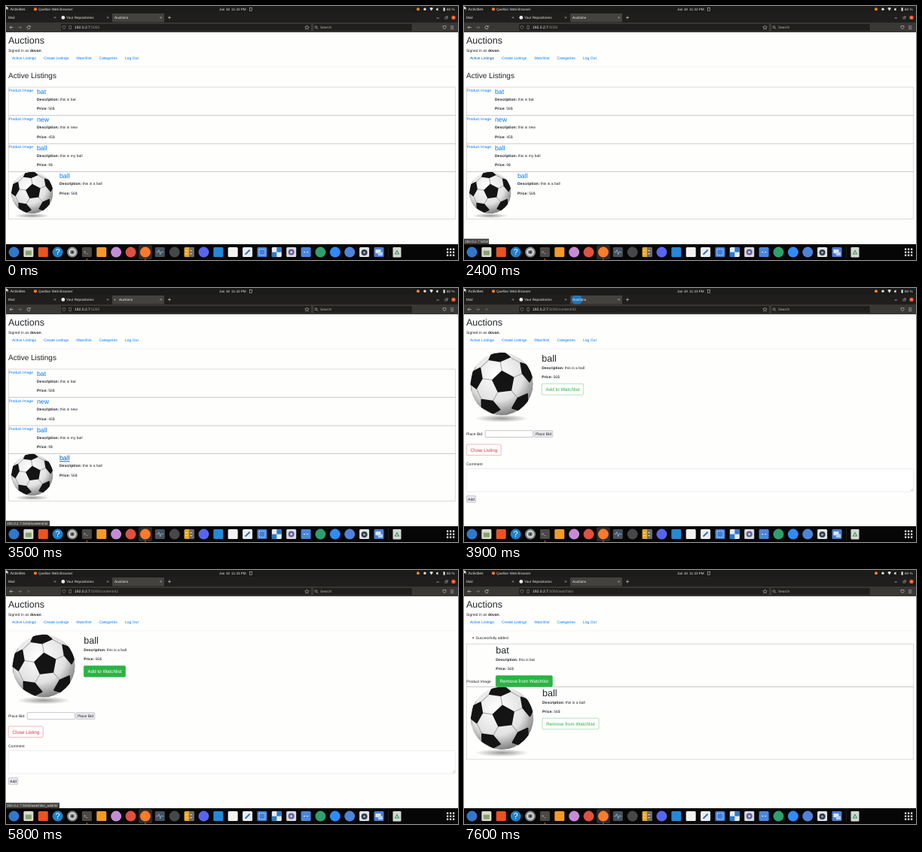
An HTML page that plays this animation: 600 by 338 pixels, repeating every 8000 ms.

```html
<!DOCTYPE html>
<html lang="en">
<head>
<meta charset="utf-8">
<title>Auctions</title>
<style>
html, body { margin: 0; width: 100%; height: 100%; overflow: hidden; background: #000; }
svg { display: block; width: 100%; height: 100%; }
text { font-family: "Liberation Sans", Arial, sans-serif; text-rendering: geometricPrecision; white-space: pre; }
</style>
</head>
<body>
<svg id="stage" viewBox="0 0 600 338"></svg>
<script>
const LOOP = 8000;
const HOST = '192.0.2.7', PORT = ':5050';
const INK = '#212529', LINK = '#007bff', LINK_HOVER = '#0056b3', GREEN = '#2ab444', RED = '#dc3545';

// Markup helpers
const text = (x, y, size, label, fill = INK, extra = '') =>
  `<text x="${x}" y="${y}" font-size="${size}" fill="${fill}" ${extra}>${label}</text>`;
const rect = (x, y, w, h, fill, extra = '') =>
  `<rect x="${x}" y="${y}" width="${w}" height="${h}" fill="${fill}" ${extra}/>`;
const circle = (x, y, r, fill, extra = '') =>
  `<circle cx="${x}" cy="${y}" r="${r}" fill="${fill}" ${extra}/>`;
const line = (d, stroke, width = 0.6, extra = '') =>
  `<path d="${d}" fill="none" stroke="${stroke}" stroke-width="${width}" ${extra}/>`;
const group = (id, content, extra = '') => `<g id="${id}" ${extra}>${content}</g>`;
const bold = label => `<tspan font-weight="700">${label}</tspan>`;
const cross = (x, y, r, stroke) =>
  line(`M${x - r} ${y - r}l${2 * r} ${2 * r}m0 ${-2 * r}l${-2 * r} ${2 * r}`, stroke, 0.5);

function button(id, x, y, w, label, color) {
  const box = (fill, ink) =>
    rect(x, y, w, 14.6, fill, `rx="1.4" stroke="${color}" stroke-width=".35"`) + text(x + 5.3, y + 9.5, 6.25, label, ink);
  return box('none', color) + group(id, box(color, '#fff'), 'opacity="0"');
}

const formButton = (x, y, w, label) =>
  rect(x, y, w, 8.8, '#e9e9ed', 'rx="1" stroke="#8f8f9d" stroke-width=".4"') + text(x + 1.9, y + 6.2, 5, label);

const details = (x, y, item, price) =>
  text(x, y, 5, `${bold('Description:')} this is ${item}`) + text(x, y + 12.4, 5, `${bold('Price:')} ${price}$`);

// Football: project a truncated icosahedron onto the unit disc
function ballMarkup() {
  const ring = (z, turn) => [0, 1, 2, 3, 4].map(k => {
    const a = k * Math.PI * 0.4 + turn;
    return [Math.cos(a) * 2 / Math.sqrt(5), Math.sin(a) * 2 / Math.sqrt(5), z];
  });
  const tilt = ([x, y, z]) => {
    const a = 0.06, b = 0.06;
    const x1 = x * Math.cos(a) + z * Math.sin(a), z1 = z * Math.cos(a) - x * Math.sin(a);
    return [x1, y * Math.cos(b) - z1 * Math.sin(b), z1 * Math.cos(b) + y * Math.sin(b)];
  };
  const low = 1 / Math.sqrt(5), turn = -1.7;
  const centers = [[0, 0, 1], ...ring(low, turn), ...ring(-low, turn + Math.PI / 5)].map(tilt);
  const dot = (a, b) => a[0] * b[0] + a[1] * b[1] + a[2] * b[2];
  const corner = (a, b) => {
    const p = a.map((v, i) => 2 * v + b[i]);
    const n = Math.hypot(...p);
    return p.map(v => v / n);
  };
  const xy = p => p[0].toFixed(3) + ' ' + p[1].toFixed(3);
  let patches = '', seams = '';
  for (const c of centers) {
    const near = centers.filter(o => dot(c, o) > 0.4 && dot(c, o) < 0.9);
    const corners = near.map(o => corner(c, o));
    near.forEach((o, i) => {
      const end = corner(o, c);
      if (corners[i][2] + end[2] > 0) seams += `M${xy(corners[i])}L${xy(end)}`;
    });
    if (c[2] < 0) continue;
    const angle = p => Math.atan2(p[1] - c[1], p[0] - c[0]);
    corners.sort((p, q) => angle(p) - angle(q));
    patches += `M${corners.map(xy).join('L')}Z`;
  }
  return `<ellipse cx="0" cy="1.1" rx=".85" ry=".12" fill="url(#shadow)"/>` +
    `<g clip-path="url(#disc)">${circle(0, 0, 1, 'url(#leather)')}` +
    line(seams, '#a5a5a5', 0.025) +
    `<path d="${patches}" fill="#141414" stroke="#141414" stroke-width=".05" stroke-linejoin="round"/></g>`;
}
const ball = (x, y, r) => `<use href="#ball" transform="translate(${x} ${y}) scale(${r})"/>`;

const defs = `<defs>
  <radialGradient id="leather" cx=".42" cy=".35" r=".68"><stop offset="0" stop-color="#fff"/>
    <stop offset=".62" stop-color="#e2e2e2"/><stop offset="1" stop-color="#777"/></radialGradient>
  <radialGradient id="shadow"><stop offset="0" stop-color="#999"/><stop offset="1" stop-color="#999" stop-opacity="0"/></radialGradient>
  <clipPath id="disc"><circle r="1"/></clipPath>
  <clipPath id="tab"><rect x="141" y="10" width="69" height="11.5"/></clipPath>
  ${group('ball', ballMarkup())}</defs>`;

// Desktop bar, tabs and toolbar
function chrome() {
  const pale = '#e6e6e3', dim = '#a5a5a0';
  return rect(0, 0, 600, 9, '#1b1b1a') + rect(0, 9, 600, 13, '#1f1e1c') + rect(0, 22, 600, 13, '#393835') +
    `<path d="M0 0v5l1.3-1.2 1 2 .8-.4-.9-1.9H4z" fill="#fff" stroke="#000" stroke-width=".3"/>` +
    text(5.5, 6, 5.1, 'Activities', pale) + circle(39, 4.3, 2.1, '#ff7a2a') +
    text(43, 6, 4.7, 'Quellan Web Browser', pale) + text(283, 6, 4.6, '', pale, 'id="clock"') +
    rect(323.5, 2.2, 3, 4, 'none', `stroke="${pale}" stroke-width=".5"`) +
    circle(547, 4.3, 2, '#f08a24') + circle(556, 4.3, 1.7, '#ddd') +
    `<path d="M562.3 3l2.4 3.5L567 3q-2.3-1.8-4.7 0z" fill="${pale}"/>` +
    `<path d="M571 3.5h1l1.5-1.3v4.4L572 5.4h-1z" fill="${pale}"/>` +
    rect(580.5, 2.3, 2.2, 4.4, pale) + text(585, 6, 4.6, '60 %', pale) +
    text(3, 17.1, 4.7, 'Mail', pale) + cross(65, 15.4, 1.1, pale) +
    circle(75.8, 15.4, 2.4, '#eee') + text(80, 17.1, 4.65, 'Your Repositories', pale) + cross(135, 15.4, 1.1, pale) +
    rect(141, 10, 69, 11.5, '#44423f', 'rx="1"') +
    `<g clip-path="url(#tab)">${circle(150, 15.5, 5, '#1688e8', 'id="burst"')}</g>` +
    circle(145, 15.4, 0.75, '#d8d8d8', 'id="spinner"') + text(144, 17.1, 4.7, 'Auctions', '#f4f4f2', 'id="tabTitle"') +
    cross(205.5, 15.4, 1.1, pale) + line('M215 15.4h4m-2-2v4', pale) +
    line('M571.5 16h3.4', pale) + line('M582.8 14.8h2.6v2.4h-2.6zm1-1h2.6v2.4', pale, 0.4) +
    circle(594, 15.4, 2.7, '#e95420') + cross(594, 15.4, 0.9, '#fff') +
    line('M9.7 28.5H5m2-2l-2 2 2 2', pale) + line('M16 28.5h4.5m-2-2l2 2-2 2', '#888') +
    group('reload', line('M31.6 27.1a2.1 2.1 0 1 0 .5 1.8m.1-2.9v1.7h-1.7', pale)) +
    group('stop', cross(30, 28.5, 1.5, '#8a8a86')) +
    rect(73, 23.4, 332, 10.2, '#201f1d', 'rx="1.2" stroke="#514f4b" stroke-width=".3"') +
    line('M75 27l2-.8 2 .8q0 3-2 4-2-1-2-4', dim, 0.5) + line('M83.8 26.3h2.6v4.2h-2.6z', dim, 0.5) +
    text(91, 30.3, 5, `${HOST}<tspan id="path" fill="#96968f"></tspan>`, '#f4f4f2') +
    line('M399.5 25.8l.8 1.8 2 .2-1.5 1.3.5 2-1.8-1.1-1.8 1.1.5-2-1.5-1.3 2-.2z', pale, 0.45) +
    rect(408, 23.4, 131, 10.2, '#201f1d', 'rx="1.2" stroke="#514f4b" stroke-width=".3"') +
    line('M412.8 29.3l1.6 1.7M410 28.1a1.5 1.5 0 1 0 3 0 1.5 1.5 0 1 0-3 0', pale, 0.5) +
    text(417, 30.3, 4.8, 'Search', '#b5b5b0') +
    line('M580 26.5h4v2q-2 4-4 0z', pale, 0.5) + line('M590 26.7h4.4m-4.4 1.9h4.4m-4.4 1.9h4.4', pale, 0.5);
}

// Launcher: plain coloured shapes ("o" round, "s" square) with a few generic details
function dock() {
  const icons = ['o#2f78cc', 's#dcdad0', 's#e95420', 'o#1d82c9', 'o#85898a', 's#4a4946', 's#f49a25', 'o#c68bd6',
    'o#df5140', 'o#ff7a2a', 's#46515c', 'o#47474a', 's#e8a72b', 'o#5865f2', 's#2389d6', 's#f2f2f0', 's#eceff1',
    's#3f80d8', 's#e4ecf4', 's#d9d9e2', 's#4a86dd', 'o#2da06c', 'o#2d8cff', 'o#4d83d9', 's#dfe3e6', 's#4a7fd6'];
  const at = i => 10.5 + i * 19.38;
  const y = 327.6;
  let out = rect(0, 317, 600, 21, '#060606') + rect(at(9) - 9, 318, 18, 19, '#2b2a29', 'rx="2"');
  icons.forEach((icon, i) => {
    const fill = icon.slice(1);
    out += icon[0] === 'o' ? circle(at(i), y, 7, fill) : rect(at(i) - 6.5, y - 6.5, 13, 13, fill, 'rx="1.5"');
  });
  out += rect(at(1) - 4, y - 2, 8, 6, '#85a36a') + text(at(3), y + 3.8, 11, '?', '#fff', 'text-anchor="middle"') +
    circle(at(4), y, 4, 'none', 'stroke="#e9e9e9" stroke-width="1.5"') + circle(at(4), y, 1.6, '#333') +
    text(at(5) - 4.5, y + 1, 5, '&gt;_', '#fff') +
    line(`M${at(10) - 5} ${y}h2l1.5-3 2 6 1.5-4 1 1h2`, '#a9c8d8', 0.7) +
    rect(at(12), y - 6.5, 6.5, 13, '#6b6b6b') + line(`M${at(12) - 5} ${y - 2}h3m3 0h3m-9 4h3m3 0h3`, '#eee', 0.8) +
    line(`M${at(16) - 3} ${y + 3}l6-6`, '#2969b0', 2) +
    rect(at(17) - 4, y - 4, 8, 8, 'none', 'stroke="#fff" stroke-width=".8" stroke-dasharray="1.5 1"') +
    rect(at(18), y - 6.5, 6.5, 6.5, '#2d7bc8') + rect(at(18) - 6.5, y, 6.5, 6.5, '#2d7bc8') +
    circle(at(19), y, 4, '#665e9b') + circle(at(19), y, 1.7, '#d2cfe8') +
    line(`M${at(20) - 3} ${y}h2m2 0h2`, '#fff', 0.9) +
    circle(at(24), y + 0.5, 4, '#333a43') + circle(at(24), y + 0.5, 1.7, '#8ba4b8') +
    rect(at(25) - 4.5, y - 3.5, 7, 5, '#dce8fa') + rect(at(25) - 1, y, 6, 4.5, '#b5cff3') +
    rect(507, 320, 0.4, 15, '#444') + rect(513.5, 321, 11, 13.5, '#d4d8d4', 'rx="1.3"') +
    line('M516.5 330l2.5-4.5 2.5 4.5z', '#3c9b57', 1.1) +
    circle(at(5), 336.8, 0.9, '#e95420') + circle(at(9), 336.8, 0.9, '#e95420');
  for (let k = 0; k < 9; k++) out += rect(585 + k % 3 * 4, 322.5 + Math.floor(k / 3) * 4, 2.3, 2.3, '#f0f0f0');
  return out;
}

const pageHeader = () => text(3, 50, 12.5, 'Auctions') + text(3, 61.4, 5, `Signed in as ${bold('dovan')}.`) +
  [[8, 'Active Listings'], [50, 'Create Listings'], [93.3, 'Watchlist'], [123.5, 'Categories'], [158, 'Log Out']]
    .map(([x, label], i) => text(x, 71.3, 5, label, LINK, `id="nav${i}"`)).join('') +
  rect(3, 80.8, 594, 0.35, '#dcdcdc');

const frame = (y, h) => rect(3.2, y, 593.6, h, 'none', 'stroke="#b9b9b9" stroke-width=".5"');
const divider = y => rect(3.2, y, 593.6, 0.6, '#a9a9a9');

function listingsPage() {
  const rows = [['bat', 'bat', 56], ['new', 'new', 45], ['ball', 'my ball', 9], ['ball', 'a ball', 56]];
  return text(3, 95.6, 10, 'Active Listings') + frame(108, 175.3) + rows.map(([name, item, price], i) => {
    const y = 108 + i * 37.5, last = i === 3, x = last ? 71 : 41;
    return (i ? divider(y - 0.2) : '') +
      (last ? ball(34.7, 248.5, 27.8) : text(3.5, y + 6.4, 5, 'Product Image', LINK)) +
      text(x, y + 8.9, 8.75, name, LINK, last ? 'id="ballLink"' : '') + details(x, y + 17.8, item, price);
  }).join('');
}

const productPage = () => ball(50, 127.6, 41.8) + text(103.3, 98, 12.5, 'ball') + details(103.3, 108, 'a ball', 56) +
  button('addHover', 103.3, 127.6, 55.3, 'Add to Watchlist', GREEN) +
  text(3, 195.8, 5, 'Place Bid:') +
  rect(28.2, 189.7, 63.2, 8.8, '#fff', 'rx=".6" stroke="#8f8f9d" stroke-width=".5"') + formButton(93, 189.7, 24.8, 'Place Bid') +
  button('closeHover', 3.2, 208, 46, 'Close Listing', RED) + text(3, 235.9, 5, 'Comment') +
  rect(3.2, 240.5, 593.6, 30.5, '#fff', 'rx="1.2" stroke="#ccd1d6" stroke-width=".4"') +
  line('M593 270l3-3m-1.2 3l1.2-1.2', '#777', 0.4) + formButton(3.2, 276.5, 12.4, 'Add');

const watchlistPage = () => circle(12.2, 90.3, 0.9, INK) + text(15.6, 91.9, 5, 'Successfully added') +
  frame(98.7, 153.3) + divider(155.2) + text(3.2, 149.8, 5, 'Product Image') +
  text(42.3, 111, 12.5, 'bat') + details(42.3, 121, 'bat', 56) +
  button('removeHover', 42.3, 140.6, 75, 'Remove from Watchlist', GREEN) +
  ball(50.5, 197.3, 41.8) + text(104, 167.5, 12.5, 'ball') + details(104, 177.5, 'a ball', 56) +
  button('removeBallHover', 104, 197.2, 75, 'Remove from Watchlist', GREEN);

document.getElementById('stage').innerHTML = defs + rect(0, 0, 600, 338, '#fefefd') + chrome() + pageHeader() +
  group('listings', listingsPage()) + group('product', productPage()) + group('watchlist', watchlistPage()) + dock() +
  group('status', rect(0, 309.7, 10, 7.5, '#42413e', 'id="statusBox"') + text(1, 315.3, 4.72, '', '#f4f4f2', 'id="statusText"'));

// Timeline
const get = id => document.getElementById(id);
const set = (id, attrs) => Object.entries(attrs).forEach(([k, v]) => get(id).setAttribute(k, v));
const show = (id, on) => set(id, { visibility: on ? 'visible' : 'hidden' });
const label = (id, value) => { if (get(id).textContent !== value) get(id).textContent = value; };
const ramp = (t, from, to) => Math.min(1, Math.max(0, (t - from) / (to - from)));

const PRODUCT_AT = 3800, WATCHLIST_AT = 6700;
const hints = [
  { from: 2050, to: 2700, path: '', width: 33 },
  { from: 3000, to: PRODUCT_AT, path: '/content/42', width: 58 },
  { from: 5050, to: WATCHLIST_AT, path: '/watchlist_add/42', width: 71 }
];

function draw(t) {
  const page = t < PRODUCT_AT ? 'listings' : t < WATCHLIST_AT ? 'product' : 'watchlist';
  for (const id of ['listings', 'product', 'watchlist']) show(id, id === page);
  label('clock', `Jan 18  11:${page === 'listings' ? 42 : 43} PM`);
  label('path', PORT + { listings: '', product: '/content/42', watchlist: '/watchlist' }[page]);

  set('nav0', { fill: t >= 2000 && t < 2650 ? LINK_HOVER : LINK });
  const overBall = t >= 2950;
  set('ballLink', { fill: overBall ? LINK_HOVER : LINK, 'text-decoration': overBall ? 'underline' : 'none' });
  set('addHover', { opacity: ramp(t, 4650, 4780) });
  set('removeHover', { opacity: ramp(t, 7270, 7420) });

  const loading = (t >= 3400 && t < PRODUCT_AT) || (t >= 5850 && t < WATCHLIST_AT);
  const stopping = (t >= 3550 && t < 4400) || (t >= 5800 && t < WATCHLIST_AT);
  show('stop', stopping);
  show('reload', !stopping);
  show('spinner', loading);
  set('spinner', { cx: 146 - 1.8 * Math.cos((t - 3400) / 1000 * Math.PI * 2) });
  set('tabTitle', { x: loading ? 150 : 144 });
  const burst = ramp(t, PRODUCT_AT, 4350);
  show('burst', burst > 0 && burst < 1);
  set('burst', { r: 4 + 16 * burst, opacity: 0.9 * (1 - burst) });

  const hint = hints.find(h => t >= h.from && t < h.to);
  show('status', hint);
  if (hint) {
    set('status', { opacity: ramp(t, hint.from, hint.from + 120) });
    set('statusBox', { width: hint.width });
    label('statusText', HOST + PORT + hint.path);
  }
}

const start = performance.now();
function tick() {
  draw((performance.now() - start) % LOOP);
  requestAnimationFrame(tick);
}
tick();
</script>
</body>
</html>
```
